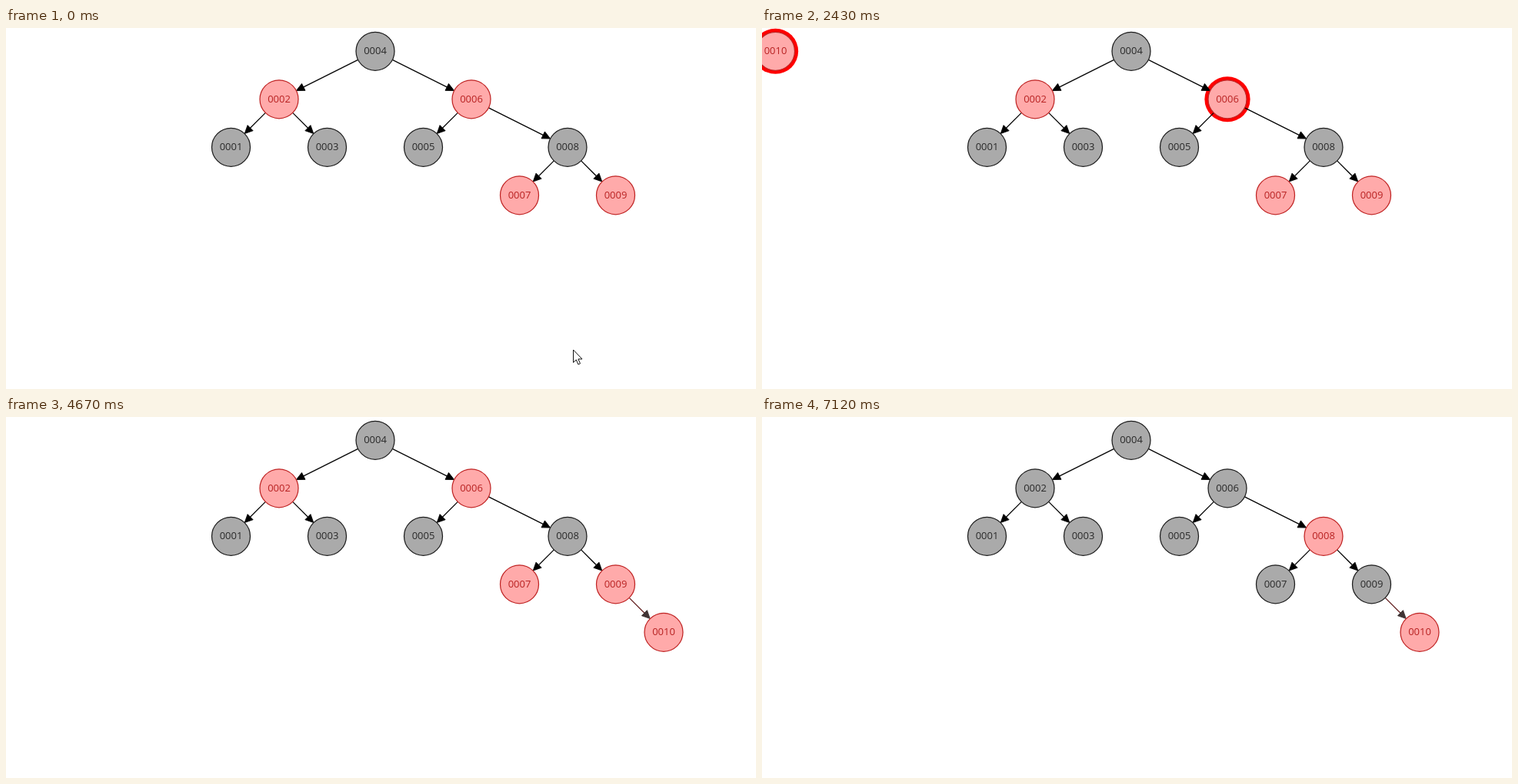
These frames come from a looping animation (975x470 px, 7520 ms). An HTML page:

```html
<!DOCTYPE html>
<html lang="en">
<head>
<meta charset="utf-8">
<title>Red-black tree insertion</title>
<style>
  html, body { margin: 0; width: 100%; height: 100%; overflow: hidden; background: #fff; }
  svg { display: block; width: 975px; height: 470px; }
  text { font: 13px "Open Sans", "Noto Sans", sans-serif; text-anchor: middle; }
</style>
</head>
<body>
<svg id="stage" viewBox="0 0 975 470"></svg>
<script>
const stage = document.getElementById('stage');
const LOOP = 7520, TICK = 203.25, LAST_TICK = 36;
const RADIUS = 25, UNIT = 62.5;

// Column and row of each node on the tree grid
const GRID = { 4: [3, 0], 2: [1, 1], 6: [5, 1], 1: [0, 2], 3: [2, 2], 5: [4, 2],
               8: [7, 2], 7: [6, 3], 9: [8, 3], 10: [9, 4] };
const EDGES = [[4, 2], [4, 6], [2, 1], [2, 3], [6, 5], [6, 8], [8, 7], [8, 9]];
const place = id => ({ x: 292.5 + GRID[id][0] * UNIT, y: 30.25 + GRID[id][1] * UNIT });
const ENTRY = { x: 17.5, y: 30.25 };

// The search visits each node for one block, then travels for one block
const SEARCH = [4, 6, 8, 9], HALO = [8, 4.9, 9.3, 5.2];
const SEARCH_START = 1620, BLOCK = 375;

const mix = (a, b, u) => ({ x: a.x + (b.x - a.x) * u, y: a.y + (b.y - a.y) * u });

function redNodes(tick) {
  if (tick < 27) return [2, 6, 7, 9, 10];
  if (tick < 31) return [2, 6, 8, 10];
  return tick < 35 ? [4, 8, 10] : [8, 10];
}

function searchState(time) {
  const elapsed = time - SEARCH_START;
  const step = Math.floor(elapsed / (2 * BLOCK));
  if (step < 0) return { entry: ENTRY };
  if (step >= SEARCH.length) return { entry: place(10), linked: true };
  const inStep = elapsed - step * 2 * BLOCK;
  if (inStep < BLOCK)
    return { entry: ENTRY, lit: SEARCH[step], halo: HALO[step] - 0.004 * inStep };
  const u = inStep / BLOCK - 1;
  if (step === SEARCH.length - 1)
    return { entry: mix(ENTRY, place(10), u), linked: true };
  return { entry: ENTRY, ring: mix(place(SEARCH[step]), place(SEARCH[step + 1]), u) };
}

function cursorAt(tick) {
  if (tick < 3) return mix({ x: 737.5, y: 419 }, { x: 26, y: 40 }, tick / 2);
  if (tick >= 31 && tick < 35)
    return mix({ x: 411.5, y: 149 }, { x: 920, y: 419 }, (tick - 31) / 3);
  return null;
}

const circle = (p, r, attrs) => `<circle cx="${p.x}" cy="${p.y}" r="${r}" ${attrs}/>`;

function node(id, p, isRed) {
  const [fill, stroke, ink] = isRed ? ['#ffaaaa', '#c02424', '#b82222'] : ['#aaa', '#1c1c1c', '#2a2a2a'];
  return circle(p, RADIUS, `fill="${fill}" stroke="${stroke}" stroke-width="1.25"`) +
    `<text x="${p.x}" y="${p.y + 4}" fill="${ink}">${String(id).padStart(4, '0')}</text>`;
}

function edge(from, to, line = '#000', head = '#000') {
  const angle = Math.atan2(to.y - from.y, to.x - from.x);
  const length = Math.hypot(to.x - from.x, to.y - from.y);
  const tip = length - RADIUS;
  return `<g transform="translate(${from.x} ${from.y}) rotate(${angle * 180 / Math.PI})">
    <path d="M${RADIUS} 0H${tip - 5}" stroke="${line}" stroke-width="1.25"/>
    <path d="M${tip} 0l-10.5 -5v10z" fill="${head}" stroke="${head}" stroke-width=".8"/></g>`;
}

function cursor(p) {
  return `<path transform="translate(${p.x} ${p.y})" fill="#fff" stroke="#111"
    d="M0 0V16.5L3.8 13 6.4 19 9 17.9 6.4 12H11.5Z"/>`;
}

function render(tick) {
  const { entry, lit, halo, ring, linked } = searchState(tick * TICK);
  const red = redNodes(tick);
  const where = id => id === 10 ? entry : place(id);
  const ids = Object.keys(GRID).map(Number).filter(id => id !== 10 || tick >= 6);
  const pointer = cursorAt(tick);

  let out = '';
  if (lit) out += [lit, 10].map(id => circle(where(id), RADIUS + halo, 'fill="#f00"')).join('');
  out += EDGES.map(([a, b]) => edge(place(a), place(b))).join('');
  if (linked) out += edge(place(9), entry, '#5c1616', '#403434');
  out += ids.map(id => node(id, where(id), red.includes(id))).join('');
  if (ring) out += circle(ring, RADIUS, 'fill="none" stroke="#070" stroke-width="5"');
  if (pointer) out += cursor(pointer);
  stage.innerHTML = out;
}

let shown = -1;
function frame() {
  const time = performance.now() % LOOP;
  const tick = Math.min(LAST_TICK, Math.floor((time + 12) / TICK));
  if (tick !== shown) render(shown = tick);
  requestAnimationFrame(frame);
}
frame();
</script>
</body>
</html>
```
